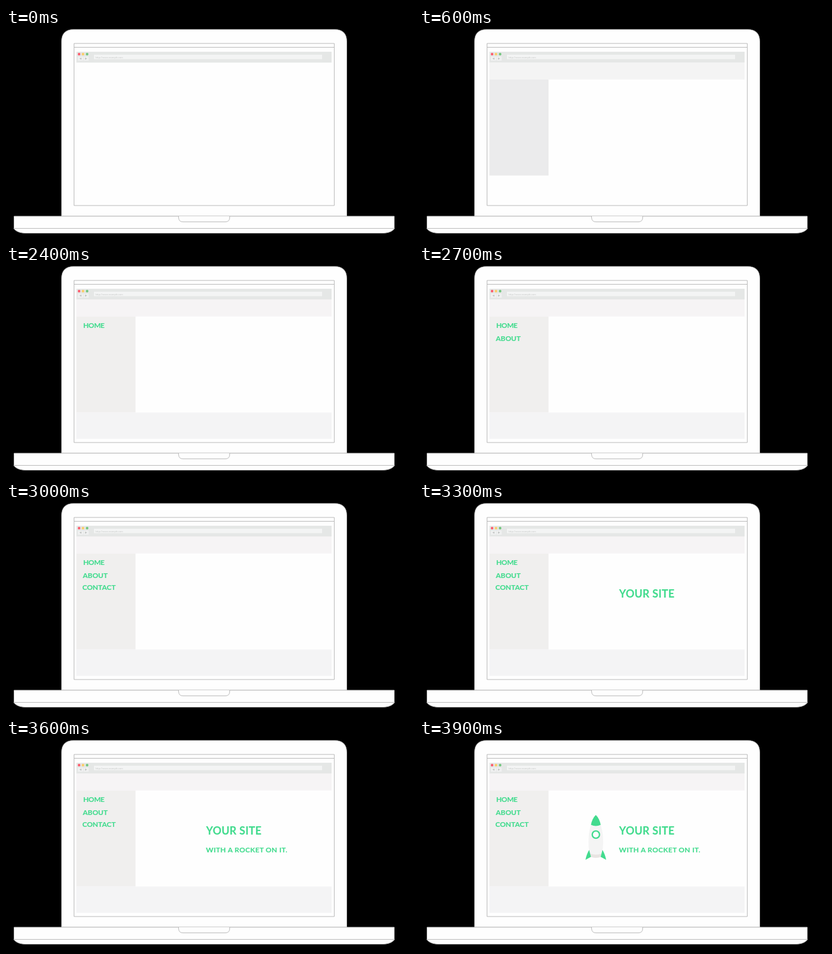
An HTML page for the animation above (4200 ms loop, 685x352 px).

```html
<!DOCTYPE html>
<html lang="en">
<head>
<meta charset="utf-8">
<title>Building a site</title>
<style>
  html, body { margin: 0; width: 100%; height: 100%; overflow: hidden; background: #000; }
  svg { display: block; width: 685px; height: 352px; }
  .line { fill: #fefefe; stroke: #b9b9b9; stroke-width: 1; }
  .green { fill: #42db8e; }
  .copy { font: 700 12px Lato, sans-serif; fill: #42db8e; stroke: #42db8e; stroke-width: .15; stroke-linejoin: round; }

  /* every part pops in at its own moment of the 4.2 s loop */
  .pop { opacity: 0; animation: 4.2s step-end infinite; }
  .header { fill: #f4f4f4; animation-name: header; }
  .side { fill: #ebebec; animation-name: side; }
  .footer { fill: #f4f4f5; animation-name: footer; }
  .home { animation-name: home; }
  .about { animation-name: about; }
  .contact { animation-name: contact; }
  .title { animation-name: title; }
  .tagline { animation-name: tagline; }
  .rocket { animation-name: rocket; }

  @keyframes header {
    0% { opacity: 0; fill: #f4f4f4; }
    7.142% { opacity: 1; fill: #f4f4f4; }
    28.571%, 100% { opacity: 1; fill: #f6f4f5; }
  }
  @keyframes side {
    0% { opacity: 0; fill: #ebebec; }
    14.285% { opacity: 1; fill: #ebebec; }
    28.571%, 100% { opacity: 1; fill: #f0efee; }
  }
  @keyframes footer { 0% { opacity: 0; } 21.428%, 100% { opacity: 1; } }
  @keyframes home { 0% { opacity: 0; } 57.142%, 100% { opacity: 1; } }
  @keyframes about { 0% { opacity: 0; } 64.285%, 100% { opacity: 1; } }
  @keyframes contact { 0% { opacity: 0; } 71.428%, 100% { opacity: 1; } }
  @keyframes title { 0% { opacity: 0; } 78.571%, 100% { opacity: 1; } }
  @keyframes tagline { 0% { opacity: 0; } 85.714%, 100% { opacity: 1; } }
  @keyframes rocket { 0% { opacity: 0; } 92.857%, 100% { opacity: 1; } }
</style>
</head>
<body>
<svg viewBox="0 0 685 352">
  <!-- laptop -->
  <path class="line" d="M93.5 317V23Q93.5 2.5 114 2.5H553Q573.5 2.5 573.5 23V317Z"/>
  <path class="line" d="M13 337.5C17 343 24 345.5 34 345.5H633C643 345.5 650 343 654 337.5Z"/>
  <path class="line" d="M13.5 317H653.5V337.5H13.5Z"/>
  <path class="line" d="M290.5 317V319Q290.5 326.5 298 326.5H369Q376.5 326.5 376.5 319V317"/>
  <path class="line" d="M114.5 26H552.5V299H114.5ZM114.5 32.5H552.5"/>

  <!-- browser bar -->
  <rect x="118.5" y="40" width="429.5" height="18.3" fill="#e5e7e6"/>
  <circle cx="123" cy="44" r="2.2" fill="#fb5f70"/>
  <circle cx="129.6" cy="44" r="2.2" fill="#fccd6b"/>
  <circle cx="136.5" cy="44" r="2.2" fill="#74c680"/>
  <path d="M121 48.2H129.6V55H121ZM130.6 48.2H139.2V55H130.6Z" fill="#f0f1f1"/>
  <path d="M127 49.8V53.4L123.4 51.6ZM133 49.8V53.4L136.6 51.6Z" fill="#c3c5c4"/>
  <rect x="148" y="45" width="384" height="7.5" fill="#f3f4f4"/>
  <text x="150.5" y="50.5" font-family="Lato, sans-serif" font-size="4.2" fill="#c6c8c7">http://www.example.com</text>

  <!-- page blocks -->
  <rect class="pop header" x="118.5" y="58" width="429.5" height="28.7"/>
  <rect class="pop side" x="118.5" y="86.7" width="99.5" height="161.8"/>
  <rect class="pop footer" x="118.5" y="248.5" width="429.5" height="44.3"/>

  <!-- copy -->
  <text class="pop copy home" x="130" y="106" letter-spacing="-.4">HOME</text>
  <text class="pop copy about" x="129.2" y="128">ABOUT</text>
  <text class="pop copy contact" x="128.4" y="148">CONTACT</text>
  <text class="pop copy title" x="336.8" y="161" style="font-size:18px" letter-spacing=".25">YOUR SITE</text>
  <text class="pop copy tagline" x="336.5" y="191" letter-spacing=".32">WITH A ROCKET ON IT.</text>

  <!-- rocket -->
  <g class="pop rocket">
    <path d="M287.5 192H307.8L306.5 198.5Q297.6 202 288.8 198.5Z" fill="#e8e4e2"/>
    <path d="M289.7 144C284.8 157 284 178 287.2 193Q297.6 196.5 308 193C311.2 178 310.4 157 305.5 144Z" fill="#f4f4f4"/>
    <path class="green" d="M297.6 128C293.5 132 290.5 138 289.4 144.5Q297.6 148.3 305.8 144.5C304.7 138 301.7 132 297.6 128Z"/>
    <circle cx="297.7" cy="161" r="6.1" fill="#fefefe" stroke="#42db8e" stroke-width="2.4"/>
    <path class="green" d="M286.4 186.8C283.5 191.5 281.5 197 280.2 203.6L289.4 198.5ZM308.8 186.8C311.7 191.5 313.7 197 315 203.6L305.8 198.5Z"/>
  </g>
</svg>
</body>
</html>
```
